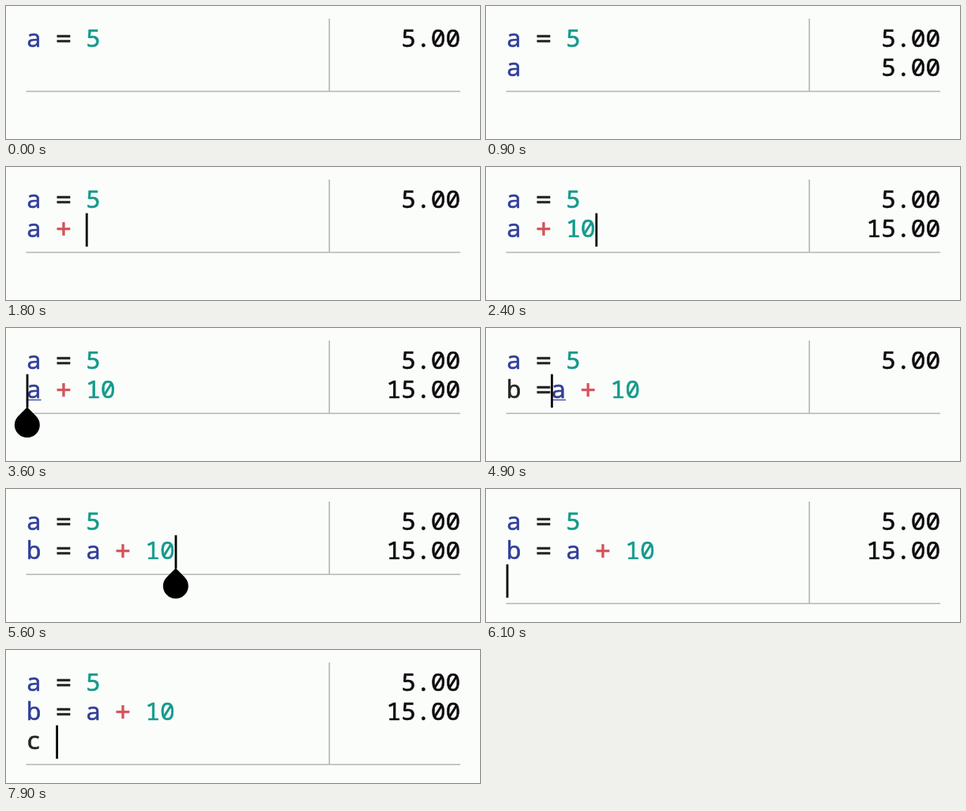
Animation, 600 px wide and 169 px high, one loop 8000 ms. Source, as an HTML page:

```html
<!DOCTYPE html>
<html lang="en">
<head>
<meta charset="utf-8">
<title>Notepad calculator</title>
<style>
  html, body { margin: 0; width: 100%; height: 100%; overflow: hidden; background: #fbfdfb; }
  svg { display: block; width: 100vw; height: 100vh; }
  text { font: 31.3px "Noto Sans Mono", "DejaVu Sans Mono", monospace; white-space: pre; stroke-width: 0.6; }
  .op { font-family: "DejaVu Sans Mono", monospace; }
</style>
</head>
<body>
<svg viewBox="0 0 600 169">
  <g stroke="#b1b3b5" stroke-width="1.6">
    <line id="divider" x1="409.3" y1="16" x2="409.3" y2="108"/>
    <line id="rule" x1="25.5" y1="108" x2="575" y2="108"/>
  </g>
  <g id="rows"></g>
  <rect id="underline" y="90.6" height="1.6" fill="#4a5cb0"/>
  <path id="handle" d="M0 -22.6 L11.3 -11.3 A16 16 0 1 1 -11.3 -11.3 Z"/>
  <rect id="caret" width="2.8" height="42.5"/>
</svg>
<script>
const LOOP = 8000, LEFT = 25.8, RIGHT = 575.3, ADVANCE = 18.8, BASE = 52, PITCH = 37, RULE = 108.5;
const INK = "#262626", BLUE = "#313f98", TEAL = "#149a8c", RED = "#d4545a";
const BLINK = 500, FADE = 150, GROW = 200;

// start time, second line, its result, caret row, caret column, extras
const steps = [
  { at: -900, line: "", result: "", row: 1, col: 0 },
  { at: 400, line: "a", result: "5.00", col: 1 },
  { at: 1100, line: "a ", col: 2 },
  { at: 1400, line: "a +", result: "", col: 3 },
  { at: 1700, line: "a + ", col: 4 },
  { at: 2000, line: "a + 1", result: "6.00", col: 5 },
  { at: 2250, line: "a + 10", result: "15.00", col: 6 },
  { at: 2900, col: 0, handle: true, mark: [0, 1], solid: 800 },
  { at: 3800, line: "ba + 10", result: "", col: 1, handle: false, mark: [0, 2], solid: 0 },
  { at: 4200, line: "b a + 10", col: 2, mark: [2, 1] },
  { at: 4600, line: "b =a + 10", col: 3, mark: [3, 1] },
  { at: 5000, line: "b = a + 10", result: "15.00", col: 4, mark: [4, 1] },
  { at: 5400, col: 10, handle: true, mark: null },
  { at: 5800, row: 2, col: 0, handle: false, third: "" },
  { at: 7200, third: "c", col: 1 },
  { at: 7700, third: "c ", col: 2 }
];
for (let i = 1; i < steps.length; i++) steps[i] = { ...steps[i - 1], ...steps[i] };

const el = id => document.getElementById(id);
const set = (node, attrs) => { for (const k in attrs) node.setAttribute(k, attrs[k]); };
const colX = col => LEFT + col * ADVANCE;
const rowY = row => BASE + row * PITCH;
const show = (node, on) => set(node, { visibility: on ? "visible" : "hidden" });
const label = (text, x, row, color, extra = "") =>
  `<text x="${x}" y="${rowY(row)}" fill="${color}" stroke="${color}" ${extra}>${text}</text>`;

function tokenColor(token, defined) {
  if (/\d/.test(token)) return TEAL;
  if (token === "+") return RED;
  return defined.includes(token) ? BLUE : INK;
}

function code(line, row) {
  const defined = /^b = /.test(line) ? ["a", "b"] : ["a"];
  return [...line.matchAll(/\w+|[^\s\w]/g)].map(({ 0: token, index }) =>
    label(token, colX(index), row, tokenColor(token, defined), /\w/.test(token) ? "" : 'class="op"')
  ).join("");
}

const result = (text, row, alpha = 1) =>
  label(text, RIGHT, row, "#0c0c0c", `text-anchor="end" opacity="${alpha}"`);

function draw(t) {
  let i = steps.length - 1;
  while (steps[i].at > t) i--;
  const s = steps[i], age = t - s.at;

  const fresh = i > 0 && !steps[i - 1].result;
  const alpha = fresh ? Math.min(1, age / FADE) : 1;
  el("rows").innerHTML = code("a = 5", 0) + result("5.00", 0) +
    code(s.line, 1) + result(s.result, 1, alpha) + code(s.third || "", 2);

  const grow = Math.max(0, Math.min(1, (t - 5800) / GROW));
  const bottom = RULE + PITCH * (1 - (1 - grow) ** 2);
  set(el("divider"), { y2: bottom });
  set(el("rule"), { y1: bottom, y2: bottom });

  const x = colX(s.col) + 1;
  set(el("caret"), { x: x - 1.2, y: rowY(s.row) - 30.3 });
  show(el("caret"), age < (s.solid || 0) || age % (2 * BLINK) < BLINK);
  set(el("handle"), { transform: `translate(${x} 123.2)` });
  show(el("handle"), s.handle);
  show(el("underline"), s.mark);
  if (s.mark) set(el("underline"), { x: colX(s.mark[0]), width: s.mark[1] * ADVANCE });
}

function tick() {
  draw(performance.now() % LOOP);
  requestAnimationFrame(tick);
}
tick();
</script>
</body>
</html>
```
